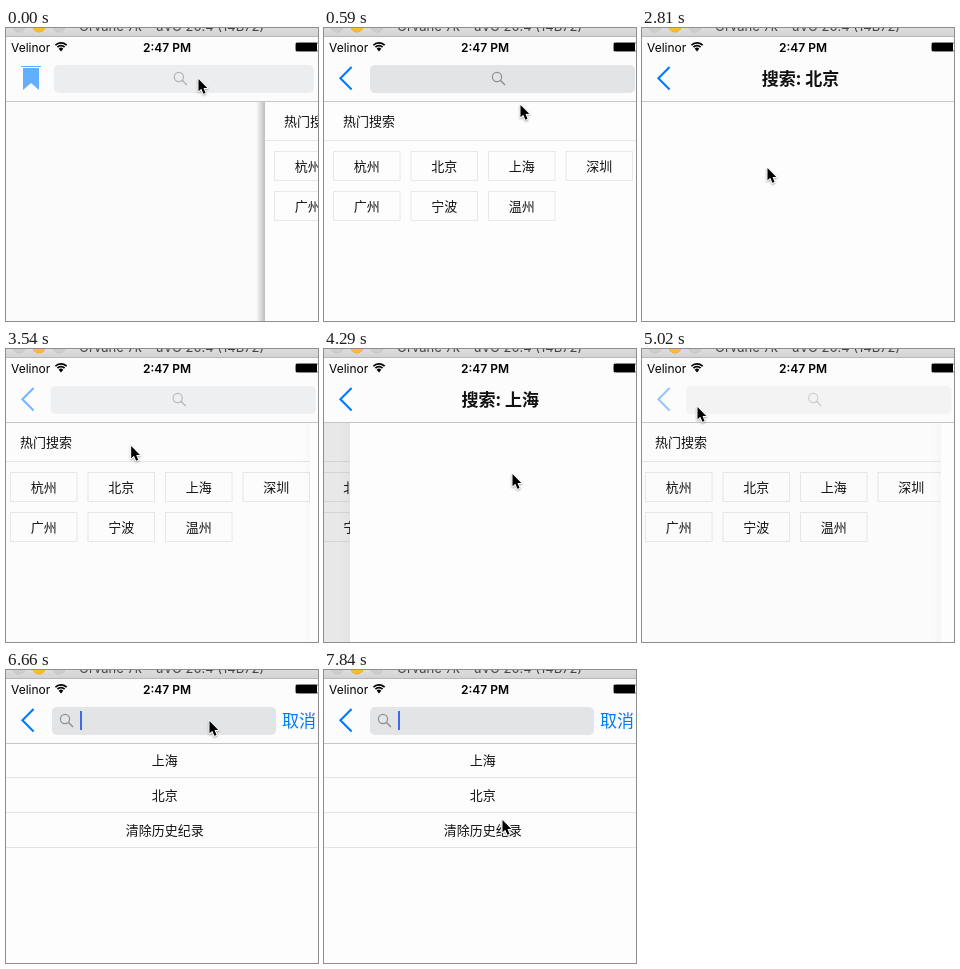
Animation, 312 px wide and 293 px high, one loop 7.99 s. Source, as an HTML page with a canvas:

```html
<!DOCTYPE html>
<html lang="zh-CN">
<head>
<meta charset="utf-8">
<title>Search navigation</title>
<style>
html, body { margin: 0; width: 100%; height: 100%; overflow: hidden; background: #fcfcfc; }
canvas { display: block; width: 312px; height: 293px; }
</style>
</head>
<body>
<canvas id="stage"></canvas>
<script>
const W = 312, H = 293, PAGE_W = 320, LOOP = 7990, STEP = 148;
const BLUE = '#007aff', NAV_BG = '#fcfcfc', PAGE_BG = '#fdfdfd', FIELD = '#e2e4e6';
const CJK = '"Noto Sans CJK SC", "Noto Sans CJK", "Noto Sans CJK JP", sans-serif';
const LATIN = 'Inter, Roboto, sans-serif';
const CITIES = ['杭州', '北京', '上海', '深圳', '广州', '宁波', '温州'];
const LIST_AT = 6640, CARET_OFF = 7240, CARET_ON = 7700;

const moves = [
  { at: -78, push: true, from: 'home', to: 'hot' },
  { at: 2163, push: true, from: 'hot', to: '北京' },
  { at: 3085, push: false, from: '北京', to: 'hot' },
  { at: 3887, push: true, from: 'hot', to: '上海' },
  { at: 4599, push: false, from: '上海', to: 'hot' }
];

// time, x, y of the pointer tip
const pointer = [
  [0, 192, 50], [300, 192, 52], [1180, 204, 124], [1320, 200, 125], [1924, 125, 139],
  [2812, 125, 139], [3085, 25, 51], [3256, 30, 54], [3750, 188, 124], [4292, 188, 124],
  [4560, 24, 50], [4850, 25, 51], [5032, 55, 57], [5476, 197, 50], [5624, 203, 50],
  [7104, 203, 50], [7400, 196, 110], [7548, 183, 161], [7844, 178, 149]
];

const canvas = document.getElementById('stage');
const ctx = canvas.getContext('2d');
const dpr = window.devicePixelRatio || 1;
canvas.width = W * dpr;
canvas.height = H * dpr;

const clamp = v => Math.max(0, Math.min(1, v));

function rect(x, y, w, h, color) {
  ctx.fillStyle = color;
  ctx.fillRect(x, y, w, h);
}

function text(str, x, y, font, color = '#111', align = 'left') {
  ctx.font = font;
  ctx.fillStyle = color;
  ctx.textAlign = align;
  ctx.fillText(str, x, y);
}

function line(points, color, width) {
  ctx.beginPath();
  points.forEach(([x, y]) => ctx.lineTo(x, y));
  ctx.strokeStyle = color;
  ctx.lineWidth = width;
  ctx.stroke();
}

function disc(x, y, r, color) {
  ctx.beginPath();
  ctx.arc(x, y, r, 0, Math.PI * 2);
  ctx.fillStyle = color;
  ctx.fill();
}

function windowTop() {
  const g = ctx.createLinearGradient(0, 0, 0, 9);
  g.addColorStop(0, '#dddddd');
  g.addColorStop(1, '#d2d2d2');
  rect(0, 0, W, 9, g);
  rect(0, 8, W, 1, '#b8b8b8');
  ['#cdcdcd', '#fdbc2e', '#cdcdcd'].forEach((c, i) => {
    disc(13 + i * 20, -2, 6.5, i === 1 ? '#e3a32c' : '#bebebe');
    disc(13 + i * 20, -2, 6, c);
  });
  text('Orvane 7k – uVO 20.4 (14B72)', 73, 3, '13px ' + LATIN, '#444');
}

function statusBar() {
  text('Velinor', 5, 23.5, '12px ' + LATIN, '#000');
  text('2:47 PM', 161, 23.5, '600 12px ' + LATIN, '#000', 'center');
  ctx.strokeStyle = '#000';
  ctx.lineWidth = 1.7;
  for (const r of [4.9, 7.7]) {
    ctx.beginPath();
    ctx.arc(55, 22.5, r, -Math.PI * 0.76, -Math.PI * 0.24);
    ctx.stroke();
  }
  ctx.beginPath();
  ctx.moveTo(55, 23.5);
  ctx.arc(55, 23, 3.2, -Math.PI * 0.76, -Math.PI * 0.24);
  ctx.fillStyle = '#000';
  ctx.fill();
  ctx.lineWidth = 1;
  ctx.strokeStyle = '#888';
  ctx.beginPath();
  ctx.roundRect(289.5, 14.5, 23, 9, 2);
  ctx.stroke();
  rect(290, 15, 21, 8, '#000');
}

function magnifier(x, y) {
  ctx.beginPath();
  ctx.arc(x - 1, y - 1, 4.6, 0, Math.PI * 2);
  ctx.strokeStyle = '#8e8e93';
  ctx.lineWidth = 1.2;
  ctx.stroke();
  line([[x + 2.3, y + 2.3], [x + 7, y + 7]], '#8e8e93', 1.5);
}

function field(x, w, iconX) {
  ctx.beginPath();
  ctx.roundRect(x, 37, w, 28, 5);
  ctx.fillStyle = FIELD;
  ctx.fill();
  magnifier(iconX, 50);
}

function bookmark() {
  rect(15, 38, 20, 1, BLUE);
  ctx.beginPath();
  [[17, 40], [33, 40], [33, 62], [25, 55], [17, 62]].forEach(p => ctx.lineTo(...p));
  ctx.fillStyle = BLUE;
  ctx.fill();
}

function chevron() {
  line([[27.6, 39], [16.4, 50.2], [27.6, 61.4]], BLUE, 2.1);
}

function navItems(page, alpha, shift, t) {
  if (alpha <= 0) return;
  ctx.save();
  ctx.globalAlpha = alpha;
  page === 'home' ? bookmark() : chevron();
  ctx.translate(shift, 0);
  if (page === 'home') {
    field(53, 260, 179);
  } else if (page !== 'hot') {
    text('搜索: ' + page, 158.5, 57, 'bold 17px ' + CJK, '#111', 'center');
  } else if (t < LIST_AT) {
    field(46, 265, 174);
  } else {
    field(46, 224, 60);
    if (t < CARET_OFF || t >= CARET_ON) rect(74, 41, 2, 19, '#4169e8');
    text('取消', 276, 57, '17px ' + CJK, BLUE);
  }
  ctx.restore();
}

function hotPage() {
  text('热门搜索', 19, 98, '13px ' + CJK);
  rect(0, 112, PAGE_W, 1, '#e6e6e6');
  CITIES.forEach((city, i) => {
    const x = 9 + (i % 4) * 77.5, y = 123 + Math.floor(i / 4) * 40;
    ctx.strokeStyle = '#e8e8e8';
    ctx.lineWidth = 1;
    ctx.strokeRect(x + 0.5, y + 0.5, 66.5, 29);
    text(city, x + 33.7, y + 20, '13px ' + CJK, '#111', 'center');
  });
}

function historyPage() {
  ['上海', '北京', '清除历史纪录'].forEach((s, i) => {
    text(s, 158.7, 95 + i * 35, '13px ' + CJK, '#111', 'center');
    rect(0, 107 + i * 35, PAGE_W, 1, '#e4e4e4');
  });
}

function drawPage(page, x, t) {
  ctx.save();
  ctx.translate(Math.round(x), 0);
  rect(0, 74, PAGE_W, H, page === 'home' ? '#fff' : PAGE_BG);
  if (page === 'hot') t < LIST_AT ? hotPage() : historyPage();
  ctx.restore();
}

// cover: 0 = top page off to the right, 1 = top page in place
function drawStack(under, top, cover, shade, t) {
  const x = Math.round(PAGE_W * (1 - cover));
  drawPage(under, -0.3 * PAGE_W * cover, t);
  rect(0, 74, W, H, `rgba(0,0,0,${0.09 * cover})`);
  const g = ctx.createLinearGradient(x - 9, 0, x, 0);
  g.addColorStop(0, 'rgba(0,0,0,0)');
  g.addColorStop(1, `rgba(0,0,0,${0.3 * shade})`);
  rect(x - 9, 74, 9, H, g);
  drawPage(top, x, t);
}

function drawNav(move, u, p, t) {
  rect(0, 9, W, 64, NAV_BG);
  rect(0, 73, W, 1, '#c6c6c6');
  const slideIn = 215, slideUnder = -27;
  if (move.push) {
    navItems(move.from, clamp(1 - u / 2), slideUnder * p, t);
    navItems(move.to, clamp((u - 1.5) / 2.5), slideIn * (1 - p), t);
  } else {
    navItems(move.from, clamp(1 - u / 4.8), slideIn * p, t);
    navItems(move.to, clamp((u - 3.7) / 2), slideUnder * (1 - p), t);
  }
}

function drawPointer(t) {
  let i = pointer.findIndex(k => k[0] > t);
  if (i < 0) i = pointer.length;
  const a = pointer[i - 1], b = pointer[i] || a;
  const f = a === b ? 0 : (t - a[0]) / (b[0] - a[0]);
  ctx.save();
  ctx.translate(a[1] + (b[1] - a[1]) * f + 0.5, a[2] + (b[2] - a[2]) * f + 1);
  ctx.scale(0.88, 0.88);
  ctx.beginPath();
  [[0, 0], [0, 14], [3.2, 11.2], [5.6, 16.8], [8, 15.8], [5.7, 10.3], [10, 10.2]]
    .forEach(p => ctx.lineTo(...p));
  ctx.closePath();
  ctx.lineJoin = 'round';
  ctx.strokeStyle = '#fff';
  ctx.lineWidth = 2.2;
  ctx.shadowColor = 'rgba(0,0,0,0.35)';
  ctx.shadowBlur = 2 * dpr;
  ctx.shadowOffsetY = dpr;
  ctx.stroke();
  ctx.shadowColor = 'transparent';
  ctx.fillStyle = '#000';
  ctx.fill();
  ctx.restore();
}

function draw(t) {
  const move = moves.filter(m => m.at <= t).pop();
  // critically damped spring, settled once the rest is too small to see
  const u = (t - move.at) * 0.0102;
  const p = u > 6.3 ? 1 : 1 - (1 + u) * Math.exp(-u);
  ctx.setTransform(dpr, 0, 0, dpr, 0, 0);
  if (move.push) drawStack(move.from, move.to, p, 1 - p, t);
  else drawStack(move.to, move.from, 1 - p, 1 - p, t);
  drawNav(move, u, p, t);
  statusBar();
  windowTop();
  drawPointer(t);
}

const start = performance.now();
function tick() {
  const t = (performance.now() - start) % LOOP;
  // the screen refreshes in coarse, even steps
  draw(Math.min(53, Math.floor((t + 16) / STEP)) * STEP);
  requestAnimationFrame(tick);
}
tick();
</script>
</body>
</html>
```
